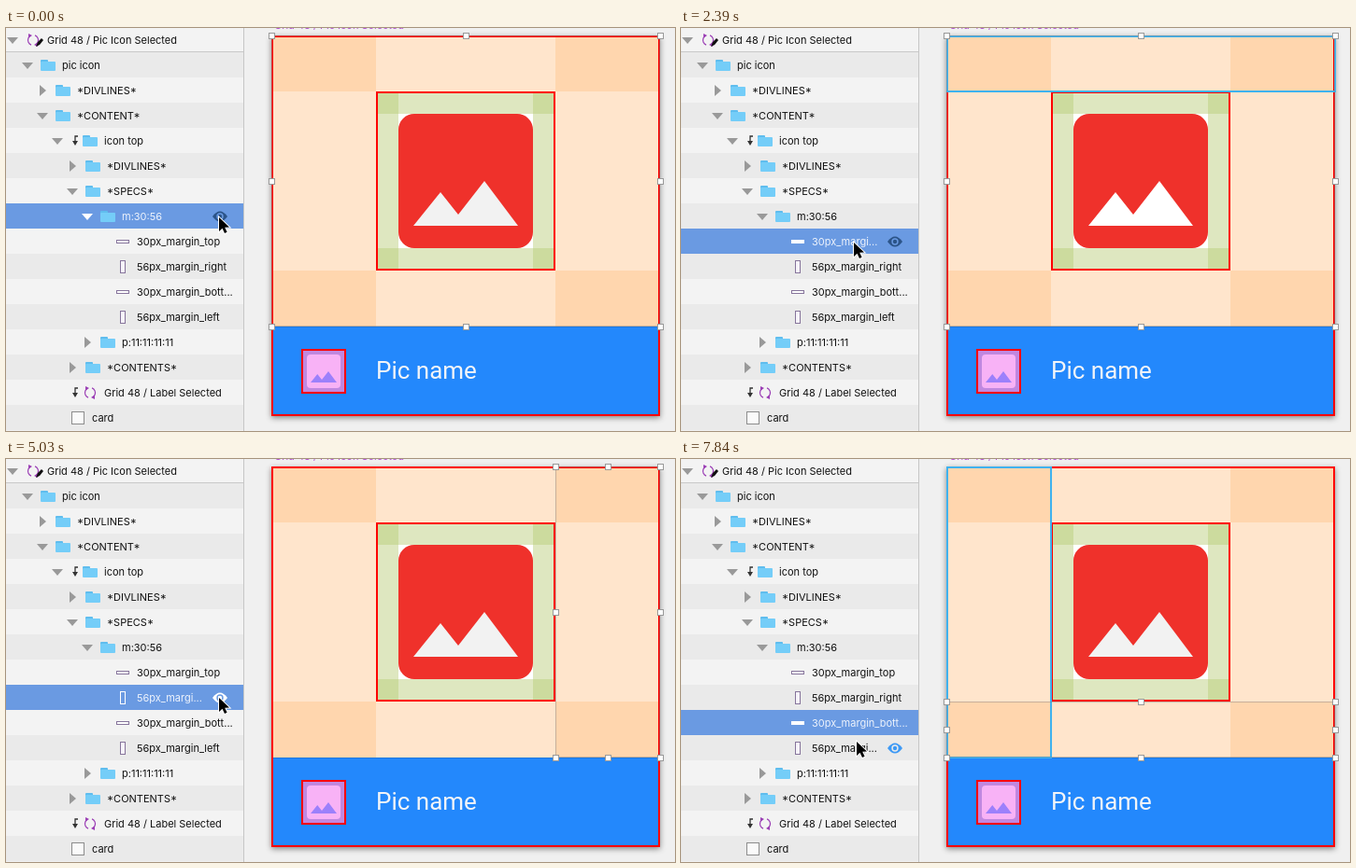
An HTML page with a canvas for the animation above (7990 ms loop, 716 by 432 pixels).

```html
<!DOCTYPE html>
<html lang="en">
<head>
<meta charset="utf-8">
<title>Layer list</title>
<style>
html, body { margin: 0; width: 100%; height: 100%; overflow: hidden; background: #f0f0f0; }
canvas { display: block; }
</style>
</head>
<body>
<canvas id="stage" width="716" height="432"></canvas>
<script>
const ctx = document.getElementById('stage').getContext('2d');
const LOOP = 7990;
const PURPLE = '#9b3fb5';

// Layer list: text position, icon kind, disclosure triangle, mask arrow
const rows = [
  { name: 'Grid 48 / Pic Icon Selected', x: 44, icon: 'symbol', open: true },
  { name: 'pic icon', x: 60, icon: 'folder', open: true },
  { name: '*DIVLINES*', x: 76, icon: 'folder', open: false },
  { name: '*CONTENT*', x: 76, icon: 'folder', open: true },
  { name: 'icon top', x: 105, icon: 'folder', open: true, mask: true },
  { name: '*DIVLINES*', x: 108, icon: 'folder', open: false },
  { name: '*SPECS*', x: 108, icon: 'folder', open: true },
  { name: 'm:30:56', x: 124, icon: 'folder', open: true },
  { name: '30px_margin_top', x: 140, icon: 'wide' },
  { name: '56px_margin_right', x: 140, icon: 'tall' },
  { name: '30px_margin_bott...', x: 140, icon: 'wide' },
  { name: '56px_margin_left', x: 140, icon: 'tall' },
  { name: 'p:11:11:11:11', x: 124, icon: 'folder', open: false },
  { name: '*CONTENTS*', x: 108, icon: 'folder', open: false },
  { name: 'Grid 48 / Label Selected', x: 105, icon: 'symbol', mask: true },
  { name: 'card', x: 92, icon: 'square' }
];

// Canvas area belonging to each selectable row
const areas = {
  7: [284, 8, 416, 312],
  8: [284, 8, 416, 60],
  9: [588, 8, 112, 312],
  10: [284, 260, 416, 60],
  11: [284, 8, 112, 312]
};

// Each step changes part of the state; row numbers refer to `rows`, 0 means none
const steps = [
  [0, { x: 228, y: 203, selected: 7, handles: 7, hidden: 0, lit: false, outline: 0 }],
  [600, { lit: true }],
  [750, { hidden: 7, handles: 0 }],
  [1200, { lit: false }],
  [1350, { hidden: 0, handles: 7 }],
  [1500, { x: 215, y: 211 }],
  [1650, { x: 199, y: 223, outline: 8 }],
  [1790, { x: 188, y: 229 }],
  [1940, { x: 185, y: 230 }],
  [2390, { selected: 8 }],
  [2540, { handles: 8, outline: 0, x: 207, y: 231 }],
  [2680, { x: 225, y: 232 }],
  [2980, { lit: true }],
  [3130, { hidden: 8, handles: 0 }],
  [3700, { lit: false }],
  [3850, { hidden: 0, handles: 8 }],
  [4150, { x: 214, y: 247, outline: 9 }],
  [4300, { x: 203, y: 257 }],
  [4600, { selected: 9 }],
  [4750, { handles: 9, outline: 0, x: 215 }],
  [4880, { x: 228, y: 256 }],
  [5030, { lit: true }],
  [5180, { hidden: 9, handles: 0 }],
  [5480, { lit: false }],
  [5630, { hidden: 0, handles: 9 }],
  [5780, { x: 218, y: 271, outline: 10 }],
  [5930, { x: 209, y: 283 }],
  [6080, { selected: 10 }],
  [6220, { handles: 10, outline: 0 }],
  [6370, { x: 219 }],
  [6510, { x: 227, y: 284 }],
  [6810, { lit: true }],
  [6960, { handles: 0 }],
  [7100, { hidden: 10 }],
  [7400, { lit: false }],
  [7540, { hidden: 0, handles: 10 }],
  [7690, { x: 201, y: 292 }],
  [7840, { x: 188, y: 303, outline: 11 }]
];

const stateAt = t => Object.assign({}, ...steps.filter(s => s[0] <= t).map(s => s[1]));

function rect(color, x, y, w, h) {
  ctx.fillStyle = color;
  ctx.fillRect(x, y, w, h);
}

function frame(color, x, y, w, h, line = 1) {
  ctx.strokeStyle = color;
  ctx.lineWidth = line;
  ctx.strokeRect(x + line / 2, y + line / 2, w - line, h - line);
}

function rounded(color, x, y, w, h, r) {
  ctx.fillStyle = color;
  ctx.beginPath();
  ctx.roundRect(x, y, w, h, r);
  ctx.fill();
}

function polygon(color, x, y, points, scale = 1) {
  ctx.fillStyle = color;
  ctx.beginPath();
  points.forEach(([px, py]) => ctx.lineTo(x + px * scale, y + py * scale));
  ctx.closePath();
  ctx.fill();
}

function disc(color, x, y, r) {
  ctx.fillStyle = color;
  ctx.beginPath();
  ctx.arc(x, y, r, 0, 7);
  ctx.fill();
}

function text(str, color, font, x, y) {
  ctx.fillStyle = color;
  ctx.font = font;
  ctx.fillText(str, x, y);
}

function symbol(x, y) {
  ctx.strokeStyle = PURPLE;
  ctx.lineWidth = 1.2;
  for (const side of [1, -1]) {
    ctx.beginPath();
    ctx.arc(x, y, 5.5, side > 0 ? -1.2 : 1.94, side > 0 ? 1.1 : 4.24);
    ctx.stroke();
    polygon(PURPLE, x, y, [[1 * side, 5 * side], [5 * side, 2.5 * side], [5 * side, 7 * side]]);
  }
}

const icons = {
  folder(x, y) {
    rounded('#5fbdee', x - 8, y - 6, 8, 5, 1);
    rounded('#74cdf8', x - 8, y - 4, 16, 10, 1);
  },
  symbol,
  wide(x, y, selected) {
    rect('#fff', x - 7, y - 2, 14, 4);
    if (!selected) frame('#86749b', x - 7, y - 2, 14, 4);
  },
  tall(x, y, selected) {
    if (!selected) rect('#f7f4fa', x - 3, y - 7, 6, 14);
    frame(selected ? '#fff' : '#86749b', x - 3, y - 7, 6, 14);
  },
  square(x, y) {
    rect('#fafafa', x - 7, y - 7, 14, 14);
    frame('#8c8c8c', x - 7, y - 7, 14, 14);
  }
};

function maskArrow(x, y) {
  ctx.strokeStyle = '#333';
  ctx.lineWidth = 1.3;
  ctx.beginPath();
  ctx.moveTo(x + 3, y - 5);
  ctx.lineTo(x, y - 5);
  ctx.lineTo(x, y + 2);
  ctx.stroke();
  polygon('#333', x, y, [[-3, 0], [3, 0], [0, 5]]);
}

function eye(color, back, x, y) {
  ctx.fillStyle = color;
  ctx.beginPath();
  ctx.moveTo(x - 8, y);
  ctx.quadraticCurveTo(x, y - 11, x + 8, y);
  ctx.quadraticCurveTo(x, y + 11, x - 8, y);
  ctx.fill();
  disc(back, x, y, 3.7);
  disc(color, x, y, 2.2);
}

function drawRow(row, i, state) {
  const y = 27 * i + 13;
  const selected = i === state.selected;
  const hovered = i === Math.floor((state.y + 1) / 27);
  const back = selected ? '#6a9ae2' : i % 2 ? '#eaeaea' : '#f3f3f3';
  rect(back, 0, 27 * i - 1, 254, 27);

  const triX = row.x - (row.mask ? 50 : 37);
  const triColor = selected ? '#fff' : '#999';
  if (row.open === true) polygon(triColor, triX, y, [[-6, -3], [6, -3], [0, 4]]);
  if (row.open === false) polygon(triColor, triX, y, [[-3, -6], [4, 0], [-3, 6]]);
  if (row.mask) maskArrow(row.x - 31, y);
  icons[row.icon](row.x - 15, y, selected);

  const clipped = hovered && row.name.length > 12;
  text(clipped ? row.name.slice(0, 10) + '...' : row.name,
    selected ? '#eef3fc' : '#111', '11px Inter, sans-serif', row.x, y + 4);
  if (hovered) eye(selected ? (state.lit ? '#fff' : '#2b5488') : '#3d99f5', back, 229, y);
}

function drawSidebar(state) {
  rows.forEach((row, i) => drawRow(row, i, state));
  // Pen over the edited symbol, then the panel edges
  polygon('#111', 34, 19, [[-2, 1], [0, -4], [4, -8], [6, -6], [2, -1]]);
  rect('#c9c9c9', 0, 25, 254, 1);
  rect('#c6c6c6', 254, 0, 1, 432);
}

const peaks = [[16, 120], [45, 84], [64, 108], [92, 72], [128, 120]];

function drawCard(state) {
  text(rows[0].name, '#b04bd0', '11px Inter, sans-serif', 287, 1);
  ctx.save();
  ctx.shadowColor = 'rgba(0,0,0,.45)';
  ctx.shadowBlur = 6;
  ctx.shadowOffsetY = 2;
  rect('#fff', 284, 8, 416, 408);
  ctx.restore();

  for (const i of [8, 9, 10, 11]) {
    if (state.hidden !== i && state.hidden !== 7) rect('rgba(254,191,131,.41)', ...areas[i]);
  }

  // Large picture icon with its padding overlay
  rect('#fff', 396, 68, 192, 192);
  rect('#dee7c0', 396, 68, 192, 24);
  rect('#dee7c0', 396, 236, 192, 24);
  rect('#dee7c0', 396, 92, 24, 144);
  rect('#dee7c0', 564, 92, 24, 144);
  for (const x of [396, 564]) for (const y of [68, 236]) rect('#ccdb9e', x, y, 24, 24);
  rounded('#ef312b', 420, 92, 144, 144, 17);
  polygon(state.white ? '#fff' : '#f2f2f2', 420, 92, peaks);
  frame('#f00', 396, 68, 192, 192, 2);

  // Label bar
  rect('#2388fc', 284, 320, 416, 96);
  rect('#1f78dd', 284, 320, 416, 1);
  rect('#c088e0', 316, 344, 48, 48);
  rounded('#f8b2f6', 322, 350, 36, 36, 4);
  polygon('#9c80fb', 322, 350, peaks, 0.25);
  frame('#f00', 316, 344, 48, 48, 2);
  text('Pic name', '#f2f4f8', '26px Roboto, sans-serif', 396, 376);
  frame('#f00', 284, 8, 416, 408, 2);
}

function drawHandles([x, y, w, h]) {
  ctx.strokeStyle = 'rgba(130,130,130,.45)';
  ctx.lineWidth = 1;
  ctx.strokeRect(x + 0.5, y + 0.5, w - 1, h - 1);
  for (const u of [0, 0.5, 1]) for (const v of [0, 0.5, 1]) {
    if (u === 0.5 && v === 0.5) continue;
    const hx = x + w * u - 3, hy = y + h * v - 3;
    rect('#fff', hx, hy, 7, 7);
    frame('#999', hx, hy, 7, 7);
  }
}

function drawCursor(x, y) {
  ctx.beginPath();
  [[0, 0], [0, 15], [3.5, 11.8], [6, 17], [8.6, 15.8], [6.2, 10.8], [11, 10.6]]
    .forEach(([px, py]) => ctx.lineTo(x + px, y + py));
  ctx.closePath();
  ctx.strokeStyle = '#fff';
  ctx.lineWidth = 2;
  ctx.stroke();
  ctx.fillStyle = '#000';
  ctx.fill();
}

function draw(t) {
  const state = stateAt(t);
  state.white = t >= 750 && t < 2540;
  rect('#f0f0f0', 0, 0, 716, 432);
  drawSidebar(state);
  drawCard(state);
  if (state.outline) {
    const [x, y, w, h] = areas[state.outline];
    frame('#3fb2ee', x, y, w + 1, h + 1, 2);
  }
  if (state.handles) drawHandles(areas[state.handles]);
  drawCursor(state.x, state.y);
}

const start = performance.now();
function tick() {
  draw((performance.now() - start) % LOOP);
  requestAnimationFrame(tick);
}
tick();
</script>
</body>
</html>
```
